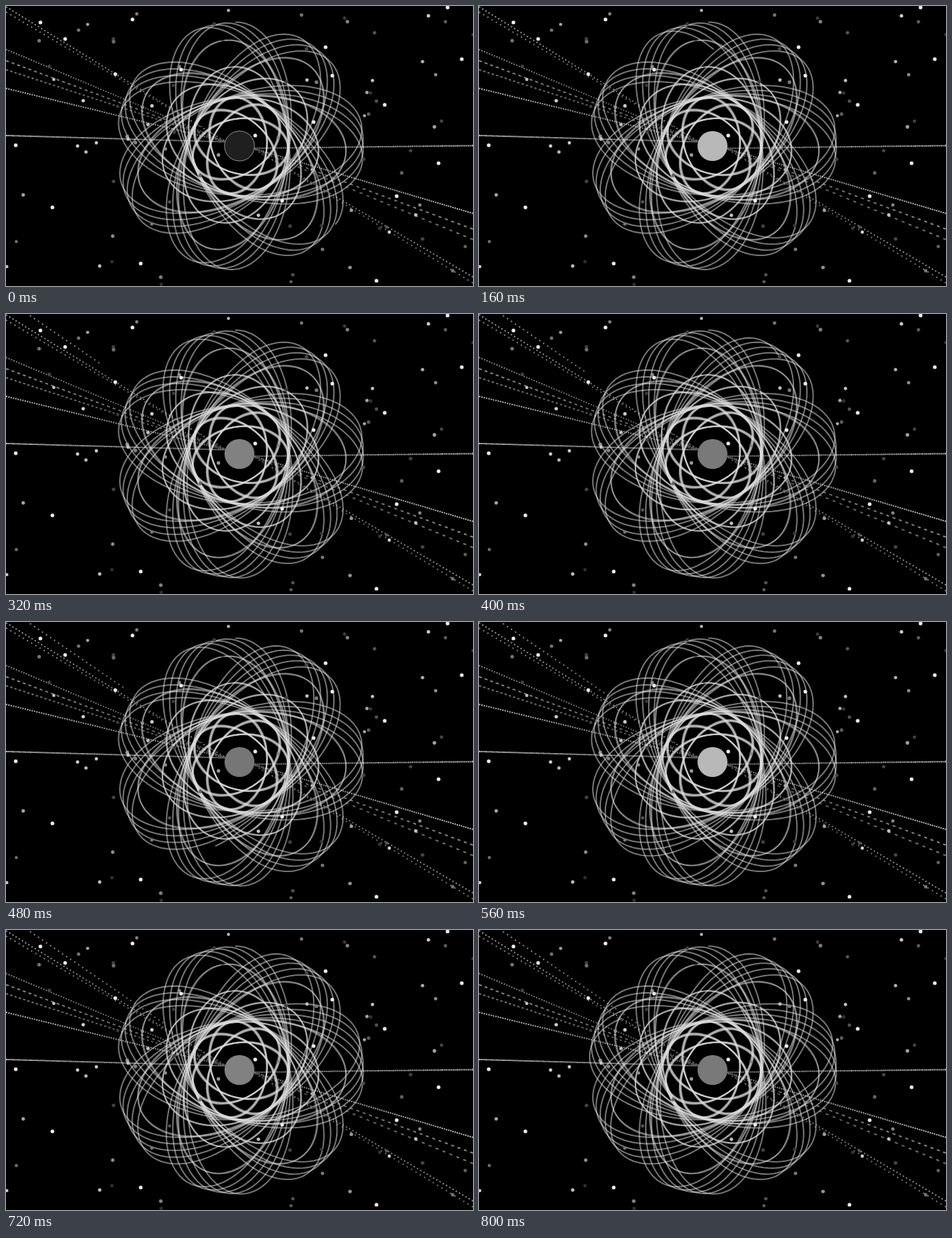
An HTML page with a canvas for the animation above (880 ms loop, 624 by 374 pixels).

```html
<!DOCTYPE html>
<html lang="en">
<head>
<meta charset="utf-8">
<title>Orbits</title>
<style>
  html, body { margin: 0; width: 100%; height: 100%; overflow: hidden; background: #000; }
  canvas { display: block; width: 624px; height: 374px; }
</style>
</head>
<body>
<canvas id="stage" width="624" height="374"></canvas>
<script>
const W = 624, H = 374, CX = 312, CY = 187;
const STEP = 80, STEPS = 11;
const RAD = Math.PI / 180;
const PETAL = 180 / 7;          // turn per half revolution that closes seven petals
const ctx = document.getElementById('stage').getContext('2d');

const grey = (v, a = 1) => `rgba(${v},${v},${v},${a})`;

function seeded(seed) {
  return () => (seed = seed * 16807 % 2147483647) / 2147483647;
}

function disc(x, y, r, fill) {
  ctx.fillStyle = fill;
  ctx.beginPath();
  ctx.arc(x, y, r, 0, 2 * Math.PI);
  ctx.fill();
}

// The brightest stars are placed, the rest are scattered
const landmarks = [
  [590, 2], [169, 18], [46, 22], [79, 44], [609, 71], [427, 55], [436, 93],
  [234, 85], [146, 91], [411, 155], [333, 173], [506, 132], [13, 186],
  [578, 210], [369, 260], [522, 254], [62, 269], [180, 344], [495, 367]
];

function stars() {
  const rnd = seeded(4711);
  for (let i = 0; i < 80; i++) {
    const x = rnd() * W, y = rnd() * H;
    disc(x, y, 2.1 + 0.4 * rnd(), grey(Math.round(45 + 170 * rnd())));
  }
  for (const [x, y] of landmarks) disc(x, y, 2.5, grey(235));
}

// Ellipse a, b that turns by `turn` degrees with every half revolution
function rosette({ a, b, start, turn, halves, alpha, width }) {
  ctx.strokeStyle = grey(222, alpha);
  ctx.lineWidth = width;
  for (let n = 0; n < halves; n++) {
    const end = Math.min(1, halves - n);
    const parts = Math.max(2, Math.ceil(end * 60));
    ctx.beginPath();
    for (let i = 0; i <= parts; i++) {
      const s = n + end * i / parts;
      const x = a * Math.cos(s * Math.PI), y = b * Math.sin(s * Math.PI);
      const rot = (start + s * turn) * RAD;
      const c = Math.cos(rot), d = Math.sin(rot);
      ctx.lineTo(CX + x * c - y * d, CY + x * d + y * c);
    }
    ctx.stroke();
  }
}

// Dotted line from the left or right edge to the middle
function ray(x, y, on, off, v, reach = 1) {
  const endX = CX + (x < CX ? -18 : 18), endY = x < CX ? 181.5 : 190;
  const fade = ctx.createLinearGradient(x, y, endX, endY);
  fade.addColorStop(0, grey(v));
  fade.addColorStop(1, grey(Math.round(v * 0.6)));
  ctx.strokeStyle = fade;
  ctx.lineWidth = 1.8;
  ctx.setLineDash([on, off]);
  ctx.beginPath();
  ctx.moveTo(x, y);
  ctx.lineTo(x + (endX - x) * reach, y + (endY - y) * reach);
  ctx.stroke();
  ctx.setLineDash([]);
}

function rays(p) {
  ray(0, 173, 1.8, 0.5, 200);
  ray(0, 110, 1.8, 1.4, 195);
  ray(0, 85, 3, 3, 120);
  ray(0, 73, 4, 4, 135);
  ray(0, 58, 1.6, 2, 150);
  ray(0, 8, 1.8, 4.7, 140);
  ray(0, 1, 1.8, 3.2, 160);
  ray(W, 186.5, 1.8, 0.7, 195);
  ray(W, 277, 1.8, 1.2, 200);
  ray(W, 298, 4, 5, 140);
  ray(W, 312, 4, 6, 120);
  ray(W, 362, 1.8, 3.2, 155);
  ray(W, 370, 1.8, 5, 130);
  // A late strand grows in from the corner
  if (p > 0.3) ray(32, 2, 1.8, 4.7, 150, 0.1 + 0.65 * p);
}

const inner = [
  { a: 65, b: 36.5, start: 265, turn: PETAL - 0.25, halves: 28, alpha: 0.5, width: 1.9 },
  { a: 106, b: 64, start: 265, turn: PETAL - 0.1, halves: 21, alpha: 0.42, width: 1.8 },
  { a: 142.5, b: 66, start: 262, turn: PETAL - 0.15, halves: 14, alpha: 0.45, width: 1.7 }
];

// The core flashes every fifth step and dims; it is dark as the loop begins
function coreGrey(step) {
  return step ? Math.round(115 + 69 * 0.45 ** ((step + 3) % 5)) : 31;
}

function draw(step) {
  ctx.fillStyle = '#000';
  ctx.fillRect(0, 0, W, H);
  rays(step / (STEPS - 1));
  inner.forEach(rosette);
  rosette({
    a: 165.5, b: 66, start: 268, turn: PETAL - 0.85,
    halves: 27 + 0.62 * step, alpha: 0.55, width: 1.8
  });
  stars();
  disc(CX, CY, 20, grey(coreGrey(step)));
  if (!step) {
    ctx.strokeStyle = grey(138);
    ctx.lineWidth = 1;
    ctx.stroke();
  }
}

let shown = -1;
function tick() {
  const step = Math.floor(performance.now() / STEP) % STEPS;
  if (step !== shown) draw(shown = step);
  requestAnimationFrame(tick);
}
tick();
</script>
</body>
</html>
```
